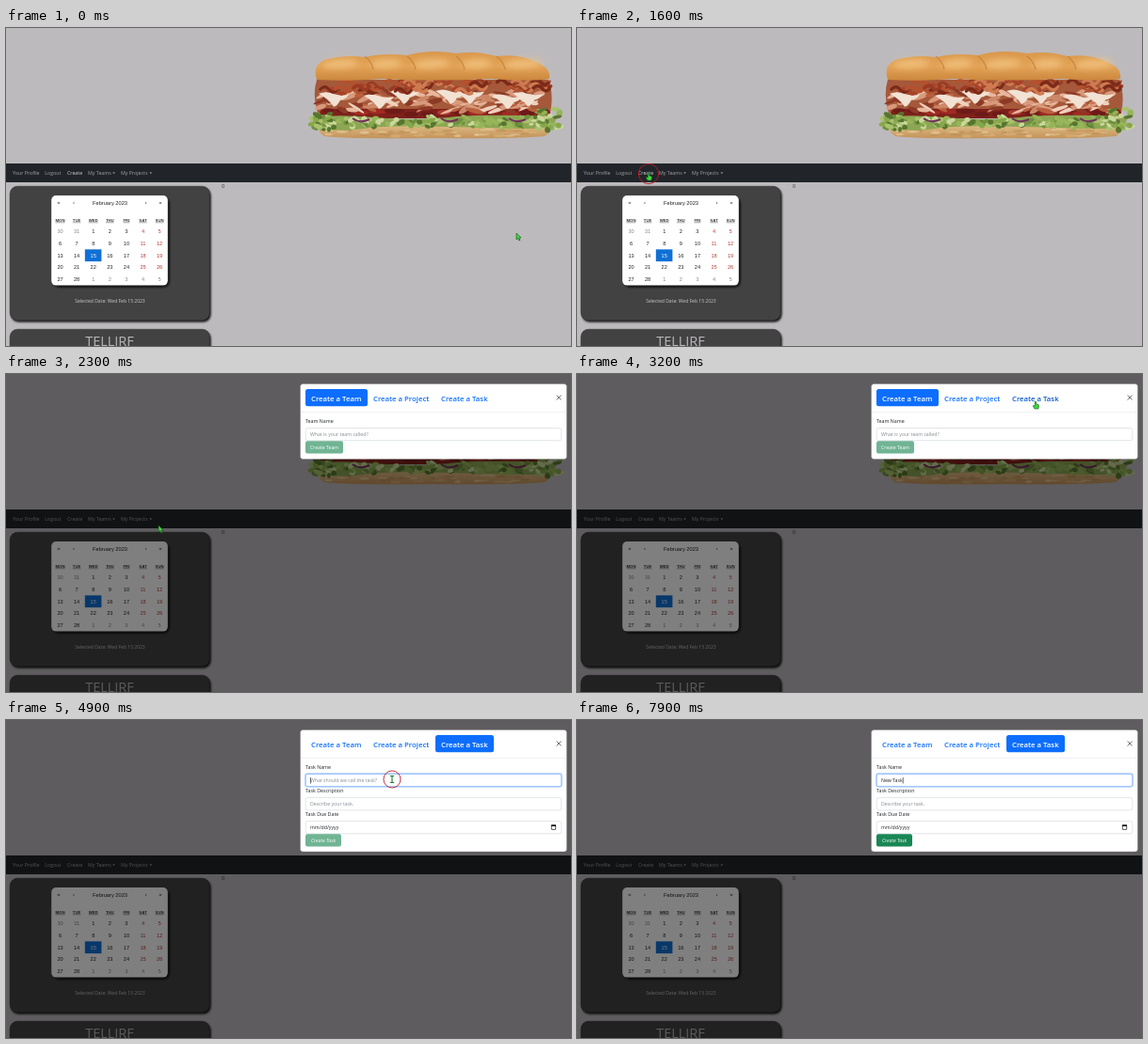
An HTML page for the animation above (8000 ms loop, 600 px wide and 338 px high).

```html
<!DOCTYPE html>
<html lang="en">
<head>
<meta charset="utf-8">
<title>Create a task</title>
<style>
html, body { margin: 0; width: 100%; height: 100%; overflow: hidden; background: #bdbabd; }
svg { display: block; width: 100vw; height: 100vh; }
text { font-family: "Open Sans", "Noto Sans", sans-serif; white-space: pre; }
.calendar text { font-family: "Liberation Sans", Arial, sans-serif; }
.tab { font-weight: 600; }
</style>
</head>
<body>
<svg id="stage" viewBox="0 0 600 338" xmlns="http://www.w3.org/2000/svg"></svg>
<script>
const LOOP = 8000;
const DIM = 1640, OPEN = 1760, SWITCH = 3480, FOCUS = 4860, TYPING = 5900, KEY_GAP = 220;
const TASK = 'New Task';
const BLUE = '#0d6efd', INK = '#212529';

let seed = 11;
const rand = (a = 0, b = 1) => {
  seed = (seed * 16807) % 2147483647;
  return a + (b - a) * seed / 2147483647;
};
const pick = list => list[Math.floor(rand(0, list.length))];
const clamp = v => Math.max(0, Math.min(1, v));
const repeat = (n, make) => Array.from({ length: n }, (_, i) => make(i)).join('');

const text = (x, y, s, size, fill, attrs = '') =>
  `<text x="${x}" y="${y}" font-size="${size}" fill="${fill}" ${attrs}>${s}</text>`;
const rect = (x, y, w, h, fill, r = 0, attrs = '') =>
  `<rect x="${x}" y="${y}" width="${w}" height="${h}" rx="${r}" fill="${fill}" ${attrs}/>`;
const path = (d, fill, attrs = '') => `<path d="${d}" fill="${fill}" ${attrs}/>`;
const blob = (x, y, rx, ry, fill, turn = 0, attrs = '') =>
  `<ellipse rx="${rx.toFixed(1)}" ry="${ry.toFixed(1)}" fill="${fill}" transform="translate(${x.toFixed(1)} ${y.toFixed(1)}) rotate(${turn.toFixed(0)})" ${attrs}/>`;
const MIDDLE = 'text-anchor="middle"';

function sandwich() {
  const lobes = [329, 381, 426, 478, 521, 577];
  const bottomBun = path('M332 100 H577 Q580 111 572 115 Q540 118 455 117 Q360 118 338 115 Q330 111 332 100Z', 'url(#base)') +
    repeat(50, () => blob(rand(338, 570), rand(106, 115), rand(2, 7), rand(.6, 1.6), pick(['#e9cfa0', '#bd8e54', '#d9b47a']), 0, 'opacity=".6"'));
  const filling = path('M330 55 H576 Q582 71 578 90 Q520 95 455 92 Q380 95 331 90 Q325 72 330 55Z', '#a5583a');
  const tomato = rect(333, 86, 245, 10, '#7e201b', 5) +
    repeat(14, i => blob(342 + i * 17.6, rand(88, 92), rand(6, 11), 2.8, pick(['#a02a22', '#6d1a18', '#b03c30'])));
  const saladBed = path('M326 96 Q345 91 390 95 T470 95 T585 94 Q584 107 560 107 T470 105 T380 107 T326 106Z', '#8ca653');
  const leaf = (x, y) => blob(x, y, rand(2, 6), rand(1.2, 3), pick(['#86a84a', '#a9c26c', '#6f9040', '#cbd79c', '#97b559', '#58752f']), rand(-50, 50));
  const salad = repeat(110, () => leaf(rand(330, 580), rand(95, 106))) +
    repeat(26, () => leaf(rand(323, 346), rand(91, 109))) +
    repeat(26, () => leaf(rand(565, 588), rand(85, 109)));
  const onion = [368, 462, 534].map(x =>
    path(`M${x} 96 q8 6 18 1`, 'none', 'stroke="#74325c" stroke-width="2"')).join('');
  const folds = repeat(95, () =>
    blob(rand(334, 574), rand(68, 88), rand(4, 12), rand(1.2, 3), pick(['#d99a7c', '#e6b79d', '#b9603f', '#efd0bc', '#cc8768', '#8c3a26']), rand(-35, 35)));
  const cheese = [346, 394, 420, 470, 490, 530, 552].map(x => {
    const y = rand(66, 72);
    return path(`M${x - 14} ${y} q8 -3 15 0 t17 1 q-3 5 -9 6 q-3 6 -7 7 q-5 -8 -16 -14Z`, '#f1e2d4');
  }).join('');
  const bacon = repeat(46, () => {
    const x = rand(327, 565), y = rand(57, 67);
    return path(`M${x} ${y} q5 -5 9 0 t8 ${rand(-3, 4)}`, 'none',
      `stroke="${pick(['#9a3a22', '#b5512e', '#7c2a18', '#cf7a50', '#a8432a'])}" stroke-width="${rand(2, 4.5).toFixed(1)}" stroke-linecap="round"`);
  });
  const topBun = path('M330 55 Q325 40 338 34 Q360 28 381 31 Q400 26 426 29 Q450 22 478 27 Q500 24 521 30 Q545 27 562 36 Q579 42 577 54 Q560 57 515 54 Q455 57 400 54 Q360 57 330 55Z', 'url(#bun)');
  const crust = lobes.slice(1).map((x, i) =>
    blob((x + lobes[i]) / 2, 38, (x - lobes[i]) * .36, 5, '#f3c583', -4, 'filter="url(#soft)" opacity=".75"')).join('');
  const creases = lobes.slice(1, -1).map(x =>
    path(`M${x} 30 q7 5 9 14`, 'none', 'stroke="#b9752f" stroke-width="1.3" opacity=".6"')).join('');
  return bottomBun + filling + tomato + saladBed + salad + onion + folds + cheese + bacon + topBun + crust + creases;
}

function calendar() {
  const colX = i => 57.5 + i * 17.6;
  const days = ['MON', 'TUE', 'WED', 'THU', 'FRI', 'SAT', 'SUN'];
  const arrows = [[56, '«'], [72, '‹'], [148.5, '›'], [164, '»']]
    .map(([x, s]) => text(x, 187.4, s, 6, '#222', MIDDLE)).join('');
  const head = days.map((d, i) => text(colX(i), 205.7, d, 4.3, '#333', MIDDLE + ' font-weight="700" text-decoration="underline"')).join('');
  const cells = repeat(35, i => {
    const n = i - 1, col = i % 7, row = Math.floor(i / 7);
    const inMonth = n >= 1 && n <= 28;
    const label = n < 1 ? n + 31 : n > 28 ? n - 28 : n;
    const fill = n === 15 ? '#fff' : !inMonth ? '#858585' : col > 4 ? '#b23a34' : '#222';
    return text(colX(col), 218 + row * 12.75, label, 5.6, fill, MIDDLE);
  });
  return rect(50, 180, 123.5, 95.5, '#0c0c0c', 6, 'filter="url(#shadow)"') + rect(48.2, 178, 123.6, 95.6, '#fff', 5) +
    `<g class="calendar">${arrows}${text(110.5, 187.5, 'February 2023', 5.7, '#222', MIDDLE)}` +
    `${head}${rect(83.8, 235.3, 17.6, 12.8, '#1070d6')}${cells}</g>`;
}

function page() {
  const dim = '#a1a4a6';
  const caret = x => path(`M${x} 153.5 h3 l-1.5 1.6z`, dim);
  const panel = (y, h) => rect(5.5, y + 2, 212, h, '#0c0c0c', 8, 'filter="url(#shadow)"') +
    rect(4.2, y + .2, 212, h, '#434243', 8, 'stroke="#2b2a2b" stroke-width=".5"');
  return rect(0, 0, 600, 338, '#bdbabd') + sandwich() +
    rect(0, 144, 600, 20, INK) +
    text(7, 156.4, 'Your Profile', 5.3, dim) + text(41.3, 156.4, 'Logout', 5.3, dim) +
    text(65, 156.4, 'Create', 5.3, dim, 'id="create"') +
    text(87, 156.4, 'My Teams', 5.3, dim) + caret(113) +
    text(122, 156.4, 'My Projects', 5.3, dim) + caret(152.3) +
    text(229, 170.3, '0', 5.3, '#333') +
    panel(168, 142.5) + calendar() +
    text(110.5, 292, 'Selected Date: Wed Feb 15 2023', 5, '#c9c7c9', MIDDLE) +
    panel(320, 40) +
    text(110, 337.5, 'TELLIRF', 14.5, '#b9b7b9', MIDDLE);
}

function dialog() {
  const field = (y, label, hint, name) =>
    text(318, y - 5, label, 5.3, INK) +
    rect(318.2, y + .2, 271.6, 13.2, '#fff', 2, 'stroke="#ced4da" stroke-width=".6"') +
    text(323, y + 8.7, hint, 5.2, '#858b91', `id="${name}"`);
  const button = (y, w, label, name, attrs = '') =>
    `<g id="${name}" opacity=".62">${rect(318, y, w, 13.3, '#198754', 2)}${text(318 + w / 2, y + 8.6, label, 5.2, '#fff', MIDDLE + attrs)}</g>`;
  const tabs = [[324, 'Team'], [390, 'Project'], [462, 'Task']]
    .map(([x, s]) => text(x, 28.6, 'Create a ' + s, 7.75, BLUE, `class="tab" id="tab${s}"`)).join('');
  return rect(312.5, 10.5, 283, 80, '#fff', 3, 'id="sheet" stroke="#777" stroke-width=".4"') +
    rect(313, 40, 282, .5, '#dee2e6') +
    rect(318, 16, 66, 18.3, BLUE, 2.5, 'id="pillTeam"') + rect(456, 16, 62, 18.3, BLUE, 2.5, 'id="pillTask"') + tabs +
    path('M584.5 22.5 l5 5 m0 -5 l-5 5', 'none', 'stroke="#777" stroke-width="1"') +
    `<g id="teamForm">${field(57.3, 'Team Name', 'What is your team called?', 'teamHint')}${button(71.2, 40, 'Create Team', 'teamButton')}</g>` +
    `<g id="taskForm">${field(57.3, 'Task Name', 'What should we call the task?', 'taskName')}` +
    field(82.4, 'Task Description', 'Describe your task.', 'taskHint') +
    field(107.4, 'Task Due Date', '', 'dueHint') + text(323, 116.1, 'mm/dd/yyyy', 5.2, INK) +
    rect(579.3, 112, 4.4, 4.4, 'none', .4, 'stroke="#111" stroke-width=".7"') + rect(579, 111.4, 5, 1.6, '#111') +
    button(121.2, 38, 'Create Task', 'taskButton', ' font-style="italic"') +
    `<g id="focus">${rect(317.7, 56.8, 272.6, 14.2, 'none', 2.4, 'stroke="#c2dbfe" stroke-width="1.5"')}` +
    rect(318.2, 57.5, 271.6, 13.2, 'none', 2, 'stroke="#86b7fe" stroke-width=".7"') + '</g>' +
    rect(323, 61, .6, 6.5, '#111', 0, 'id="caret"') + '</g>';
}

function pointers() {
  const edge = 'stroke="#14521a" stroke-width=".6" stroke-linejoin="round"';
  return '<g id="pointer">' +
    path('M0 0 L0 7 L1.6 5.5 L2.8 8 L4 7.4 L2.9 5.1 L5 4.9Z', '#3fd83f', edge + ' id="arrow"') +
    path('M-.8 .6 Q0 -.6 .8 .6 V3 L3 3.6 Q3.8 4 3.4 6 L2.8 8 H-1 L-2.8 5 Q-2.6 3.8 -.8 5Z', '#3fd83f', edge + ' id="hand"') +
    path('M-2 -3.5 H2 M0 -3.5 V3.5 M-2 3.5 H2', 'none', 'stroke="#1d7a2a" stroke-width="1.1" id="beam"') +
    '</g><circle id="ring" fill="none" stroke="#b81c2a" stroke-width=".9"/>';
}

const stage = document.getElementById('stage');
stage.innerHTML = `<defs>
  <linearGradient id="bun" x2="0" y2="1"><stop stop-color="#d9974a"/><stop offset=".5" stop-color="#e3a458"/><stop offset="1" stop-color="#cb873d"/></linearGradient>
  <linearGradient id="base" x2="0" y2="1"><stop stop-color="#e2c28c"/><stop offset="1" stop-color="#c4935a"/></linearGradient>
  <filter id="shadow"><feGaussianBlur stdDeviation=".9"/></filter>
  <filter id="soft" x="-30%" y="-80%" width="160%" height="260%"><feGaussianBlur stdDeviation="3"/></filter>
  </defs>${page()}${rect(0, 0, 600, 338, '#000', 0, 'id="backdrop"')}<g id="dialog">${dialog()}</g>${pointers()}`;

const $ = id => document.getElementById(id);
const set = (id, attrs) => { for (const k in attrs) $(id).setAttribute(k, attrs[k]); };
const show = (id, on) => set(id, { visibility: on ? 'inherit' : 'hidden' });

// Pointer stops: time, x, y
const stops = [[0, 542, 218], [100, 542, 218], [620, 75, 156], [1250, 75, 156], [1480, 76, 154],
  [1950, 76, 154], [2300, 162, 161], [3000, 487, 29], [3750, 487, 29], [4450, 410, 63], [LOOP, 410, 63]];
const clicks = [[1510, 76, 155], [3340, 487, 29], [4850, 410, 63]];

function pointerAt(t) {
  const i = stops.findIndex((s, n) => n && t <= s[0]);
  const [t0, x0, y0] = stops[i - 1], [t1, x1, y1] = stops[i];
  const p = (t - t0) / (t1 - t0), e = p * p * (3 - 2 * p);
  return [x0 + (x1 - x0) * e, y0 + (y1 - y0) * e];
}

function draw(t) {
  const onTask = t >= SWITCH;
  set('backdrop', { opacity: .5 * clamp((t - DIM) / 150) });
  set('dialog', { opacity: clamp((t - OPEN) / 150) });
  set('create', { fill: t < DIM ? '#d2d4d5' : '#a1a4a6' });

  set('sheet', { height: onTask ? 129.5 : 80 });
  const blend = clamp((t - SWITCH) / 150);
  set('pillTeam', { opacity: 1 - blend });
  set('pillTask', { opacity: blend });
  set('tabTeam', { fill: onTask ? BLUE : '#fff' });
  set('tabTask', { fill: onTask ? '#fff' : t > 2950 ? '#0a58ca' : BLUE });
  show('teamForm', !onTask);
  show('taskForm', onTask);

  const count = Math.max(0, Math.min(TASK.length, Math.floor((t - TYPING) / KEY_GAP) + 1));
  const name = $('taskName');
  const value = count ? TASK.slice(0, count) : 'What should we call the task?';
  if (name.textContent !== value) name.textContent = value;
  set('taskName', { fill: count ? INK : '#858b91' });
  set('taskButton', { opacity: .62 + .38 * clamp((t - TYPING) / 150) });
  const lastKey = count ? TYPING + (count - 1) * KEY_GAP : FOCUS;
  show('focus', t >= FOCUS);
  show('caret', t >= FOCUS && Math.floor((t - lastKey) / 530) % 2 === 0);
  set('caret', { x: 323 + (count ? name.getComputedTextLength() + .2 : 0) });

  const [x, y] = pointerAt(t);
  set('pointer', { transform: `translate(${x} ${y})` });
  show('pointer', t < TYPING);
  const kind = t > 4250 ? 'beam' : (t > 580 && t < OPEN) || (t > 2900 && t < 3850) ? 'hand' : 'arrow';
  for (const id of ['arrow', 'hand', 'beam']) show(id, id === kind);

  const click = clicks.find(c => t >= c[0] && t < c[0] + 200);
  show('ring', click);
  if (click) set('ring', { cx: click[1], cy: click[2], r: 7 + (t - click[0]) / 25 });
}

function tick(now) {
  draw(now % LOOP);
  requestAnimationFrame(tick);
}
draw(0);
requestAnimationFrame(tick);
</script>
</body>
</html>
```
